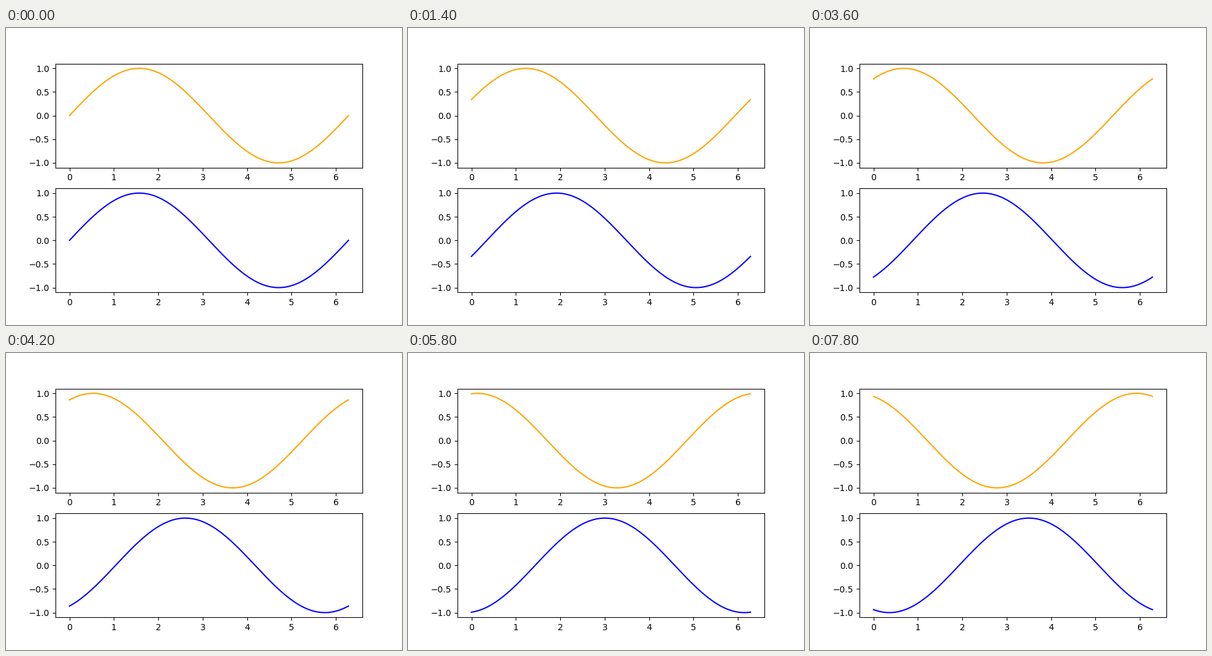
These frames come from a looping animation (640x480 px, 8000 ms). A matplotlib script:

```python
import matplotlib.pyplot as plt
import numpy as np
from matplotlib.animation import FuncAnimation

FRAMES = 40
INTERVAL = 200
STEP = 2 * np.pi / 127  # phase advance per frame

x = np.linspace(0, 2 * np.pi, 128)

fig, (top, bottom) = plt.subplots(2, 1, figsize=(6.4, 4.8), dpi=100)
left_wave, = top.plot(x, np.sin(x), color="orange")
right_wave, = bottom.plot(x, np.sin(x), color="blue")

for ax in (top, bottom):
    ax.set_xlim(-0.05 * x[-1], 1.05 * x[-1])
    ax.set_ylim(-1.1, 1.1)


def update(i):
    phase = i * STEP
    left_wave.set_ydata(np.sin(x + phase))
    right_wave.set_ydata(np.sin(x - phase))
    return left_wave, right_wave


anim = FuncAnimation(fig, update, frames=FRAMES, interval=INTERVAL,
                     repeat=True, repeat_delay=0)
plt.show()
```
